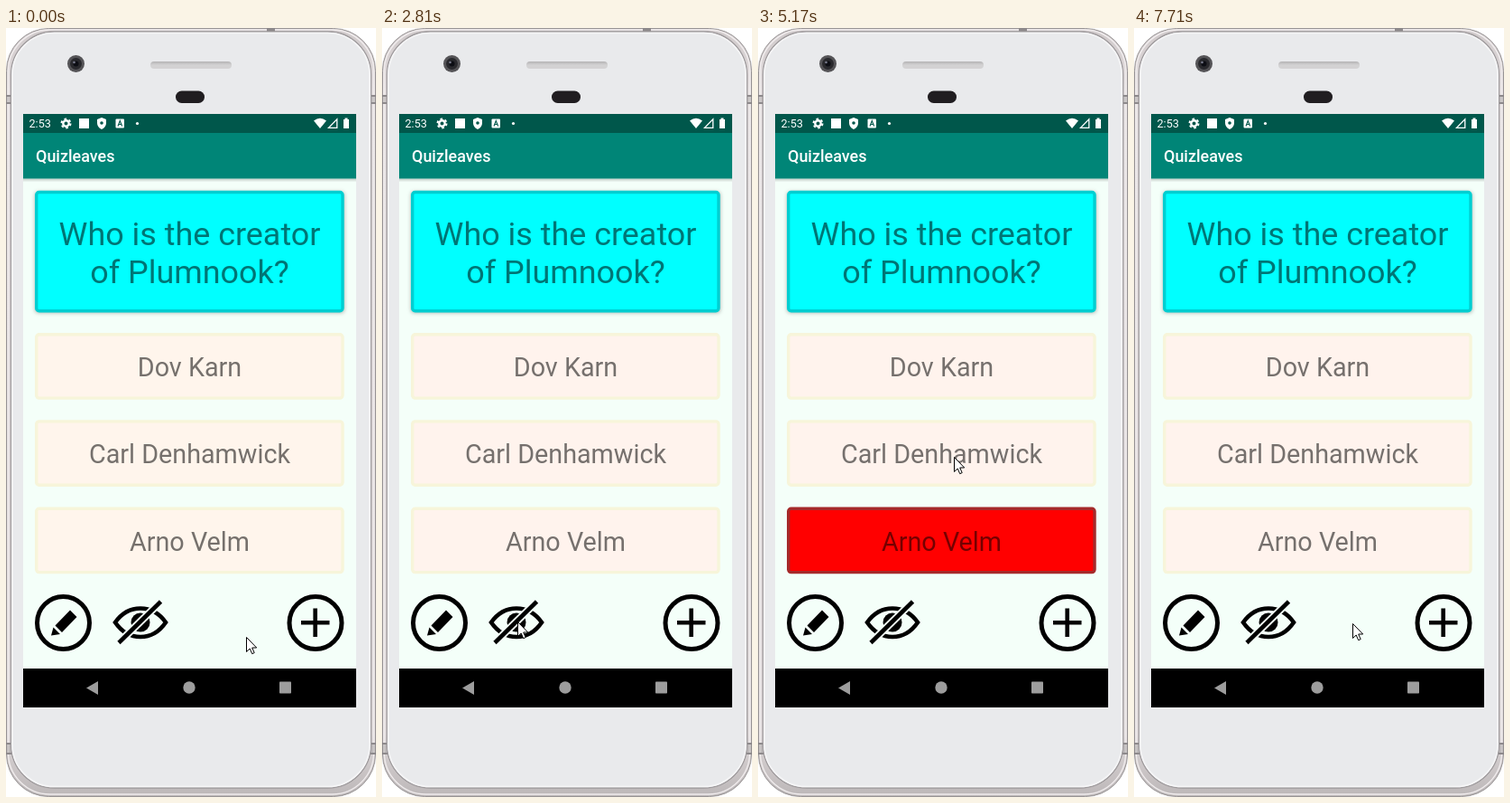
Recreate the animation shown at these times as an HTML page. Size 410 by 850 pixels, loop 8 s.

```html
<!DOCTYPE html>
<html lang="en">
<head>
<meta charset="utf-8">
<title>Quiz cards</title>
<style>
html, body { margin: 0; width: 100%; height: 100%; overflow: hidden; background: #fff; }
svg { display: block; width: 410px; height: 850px; font-family: Roboto, sans-serif; }
.card text { text-anchor: middle; fill: #000; fill-opacity: .54; }
.card rect { stroke-width: 3.4; }
.icon { fill: none; stroke: #000; stroke-width: 5; }
.solid { fill: #000; stroke: none; }
</style>
</head>
<body>
<svg viewBox="0 0 410 850">
  <defs>
    <linearGradient id="rim" x2="0" y2="1">
      <stop offset="0" stop-color="#cfc9ca"/><stop offset=".08" stop-color="#e2dcdd"/>
      <stop offset=".92" stop-color="#ddd7d8"/><stop offset="1" stop-color="#bcb7b8"/>
    </linearGradient>
    <linearGradient id="slot" x2="0" y2="1">
      <stop offset="0" stop-color="#b4b3b4"/><stop offset=".5" stop-color="#d3d2d3"/>
    </linearGradient>
    <linearGradient id="shade" x2="0" y2="1">
      <stop offset="0" stop-opacity=".2"/><stop offset="1" stop-opacity="0"/>
    </linearGradient>
    <filter id="blur" x="-5%" y="-10%" width="110%" height="125%"><feGaussianBlur stdDeviation="2"/></filter>
  </defs>

  <!-- phone body -->
  <rect x=".5" y=".5" width="409" height="849" rx="47" fill="url(#rim)" stroke="#989495"/>
  <rect x="2.5" y="2" width="405" height="845" rx="46" fill="none" stroke="#f1edee" stroke-width="1.3"/>
  <g fill="#8d898b">
    <path d="M0 74h6v2H0zM0 82h6v2H0zM404 74h6v2h-6zM404 82h6v2h-6zM0 790h6v2H0zM0 801h6v2H0zM404 790h6v2h-6zM404 801h6v2h-6z"/>
    <path d="M289 0h9v4h-9z"/>
    <path d="M0 76h6v6H0zM404 76h6v6h-6zM0 792h6v9H0zM404 792h6v9h-6z" fill-opacity=".35"/>
  </g>
  <rect x="5.500" y="4" width="399" height="836" rx="48" fill="#e9eaec" stroke="#9d999b" stroke-width="1.300"/>
  <rect x="7" y="5.500" width="396" height="833" rx="46.500" fill="none" stroke="#f5f5f6" stroke-width="1.600"/>
  <circle cx="77.500" cy="39.500" r="9.500" fill="#555457"/>
  <circle cx="77.500" cy="39.500" r="6.500" fill="#29292d"/>
  <circle cx="77.500" cy="39.500" r="3" fill="#0d0e14"/>
  <circle cx="75.500" cy="38" r="1.300" fill="#77798a"/>
  <rect x="160" y="37" width="90" height="8" rx="4" fill="url(#slot)"/>
  <rect x="188" y="69.500" width="32" height="13.500" rx="6.700" fill="#201d20"/>

  <!-- screen -->
  <rect x="19" y="95" width="369" height="656" fill="#f4fff9"/>
  <rect x="19" y="166.500" width="369" height="4" fill="url(#shade)"/>
  <rect x="19" y="95" width="369" height="21" fill="#00574b"/>
  <rect x="19" y="116" width="369" height="50.500" fill="#008577"/>
  <rect x="19" y="708" width="369" height="43"/>
  <text x="33" y="148" font-size="17.950" font-weight="500" fill="#fff">Quizleaves</text>

  <!-- status bar -->
  <g fill="#fff">
    <text x="25.500" y="110" font-size="12.600">2:53</text>
    <circle cx="66.500" cy="105.500" r="3.200" fill="none" stroke="#fff" stroke-width="2.400"/>
    <circle cx="66.500" cy="105.500" r="5" fill="none" stroke="#fff" stroke-width="2" stroke-dasharray="2.600 2.636"/>
    <rect x="81" y="100" width="11" height="11"/>
    <path d="M106 99l5 2v4q0 4.500-5 7q-5-2.500-5-7v-4z"/>
    <rect x="121.500" y="100.500" width="9.500" height="10" rx="1"/>
    <circle cx="145.500" cy="105.500" r="1.600"/>
    <path d="M341 102.500q7-5.500 14 0l-7 8.500z"/>
    <path d="M357.500 110.300h9.300v-9.500z" fill="none" stroke="#fff" stroke-width="1.300"/>
    <path d="M374 101h1.500v-1.500h3V101h1.500v10h-6z"/>
  </g>
  <circle cx="106" cy="105" r="1.800" fill="#00574b"/>
  <path d="M124 108.500l2.300-6 2.300 6M124.800 106.500h3" fill="none" stroke="#00574b" stroke-width="1.100"/>

  <!-- question -->
  <rect x="32" y="181" width="343" height="134" rx="4" fill-opacity=".28" filter="url(#blur)"/>
  <g class="card" font-size="35.920">
    <rect x="33.700" y="181.500" width="339.300" height="131.200" rx="3" fill="#0ff" stroke="#00ced1"/>
    <text x="203.500" y="240">Who is the creator</text>
    <text x="203.500" y="282">of Plumnook?</text>
  </g>
  <g id="answers"></g>

  <!-- buttons -->
  <g class="icon">
    <circle cx="63.500" cy="657.500" r="29"/>
    <path class="solid" d="M50 671.500l2.500-9 7.500 7.500zM54.500 660.500l16.500-17 7.500 7.500L62 668z"/>
    <circle cx="343" cy="657.500" r="29"/>
    <path d="M327 657.200h31.500M342.700 641.500v31.500" stroke-width="4.600"/>
    <path d="M121 657Q132 641.500 149 641.500T177 657Q166 673 149 673T121 657z" stroke-width="4.600"/>
    <circle class="solid" cx="149" cy="657" r="10.500"/>
    <g id="slash">
      <path d="M125 679.500L171.500 634" stroke="#f4fff9" stroke-width="8.600"/>
      <path d="M125 679.500L171.500 634" stroke-width="4.600"/>
    </g>
  </g>

  <!-- navigation -->
  <g fill="#9d9d9d">
    <path d="M89 729.500l13-7.500v15z"/>
    <circle cx="203" cy="729" r="6.700"/>
    <rect x="303" y="722.500" width="13" height="13" rx=".8"/>
  </g>

  <path id="cursor" d="M.5.500v16l3.700-3.500 2.500 5.700 2.500-1.100-2.500-5.600h5z" fill="#fff" stroke="#000"/>
</svg>
<script>
const LOOP = 8000;
const $ = id => document.getElementById(id);
const START = [266, 673];
// start ms, end ms, steps, goal x, goal y
const MOVES = [
  [120, 210, 2, 263, 686],
  [450, 910, 7, 150, 656],
  [1060, 1060, 1, 149.5, 656],
  [3460, 3870, 7, 198, 508],
  [3940, 4080, 3, 200, 551],
  [4910, 5170, 5, 217, 474],
  [5750, 5930, 4, 228, 417],
  [6230, 6230, 1, 231, 402],
  [6850, 6940, 2, 234, 465],
  [7090, 7240, 3, 242, 658]
];
const RED = ['#f00', '#a52a2a'], GREEN = ['#3cb371', '#2e8b57'];
// name, top, time of tap, colours after it
const ANSWERS = [
  ['Dov Karn', 337, 6510, RED],
  ['Carl Denhamwick', 433.2, 5380, GREEN],
  ['Arno Velm', 529.5, 4290, RED]
];

$('answers').innerHTML = ANSWERS.map(([name, top]) => `<g class="card" font-size="28.740">
  <rect x="33.700" y="${top + 1.7}" width="339.300" height="70.400" rx="3"/>
  <text x="203.500" y="${top + 48.2}">${name}</text></g>`).join('');
const boxes = document.querySelectorAll('#answers rect');

function cursorAt(t) {
  let [x, y] = START;
  for (const [from, to, steps, gx, gy] of MOVES) {
    if (t < from) break;
    const gap = (to - from) / (steps - 1 || 1);
    const done = gap ? Math.min(steps, Math.floor((t - from) / gap + 1e-6) + 1) : 1;
    x += (gx - x) * done / steps;
    y += (gy - y) * done / steps;
  }
  return [Math.round(x), Math.round(y)];
}

function draw(t) {
  const hidden = t >= 1550 && t < 2810;
  $('answers').style.display = hidden ? 'none' : '';
  $('slash').style.display = hidden ? 'none' : '';
  const plain = [t < 2810 ? '#fff5ec' : '#fff3ed', '#f7f5da'];
  ANSWERS.forEach(([, , tap, colours], i) => {
    const [fill, edge] = t >= tap && t < 7710 ? colours : plain;
    boxes[i].setAttribute('fill', fill);
    boxes[i].setAttribute('stroke', edge);
  });
  $('cursor').setAttribute('transform', `translate(${cursorAt(t)})`);
}

const begin = performance.now();
function tick() {
  draw((performance.now() - begin) % LOOP);
  requestAnimationFrame(tick);
}
tick();
</script>
</body>
</html>
```
